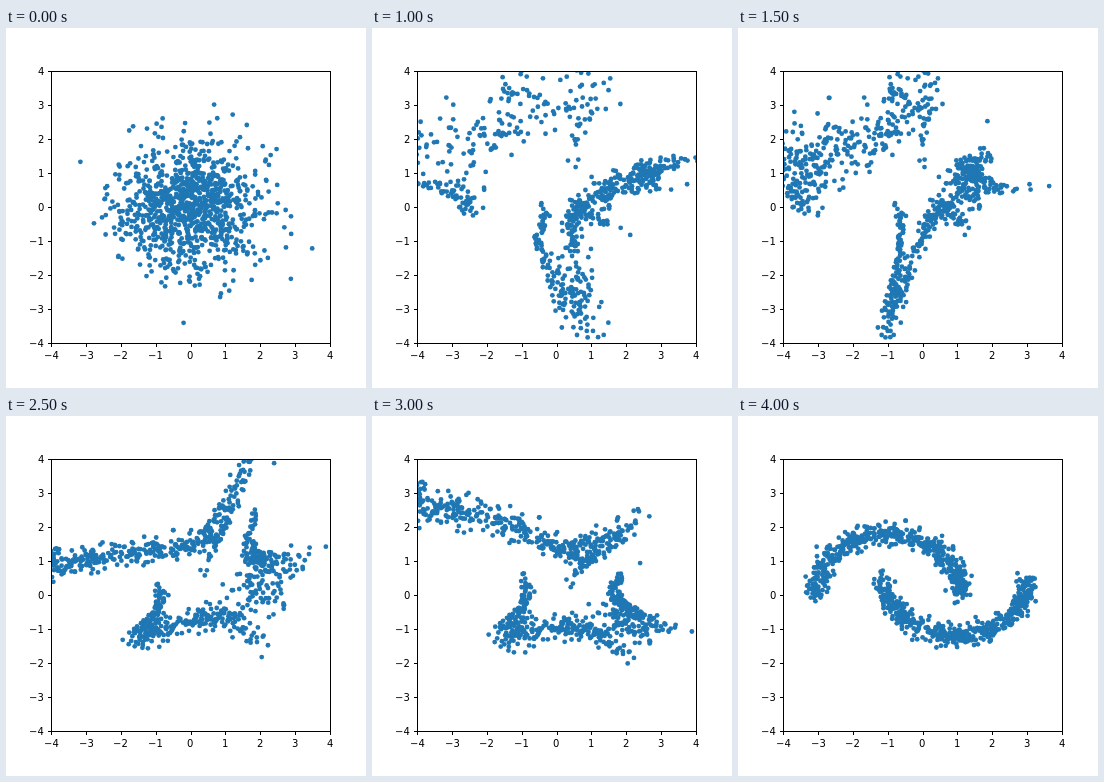
An HTML page with a canvas for the animation above (4.5 s loop, 360x360 px).

```html
<!DOCTYPE html>
<html lang="en">
<head>
<meta charset="utf-8">
<title>Coupling flow</title>
<style>
html, body { margin: 0; width: 100%; height: 100%; overflow: hidden; background: #fff; }
canvas { display: block; }
</style>
</head>
<body>
<canvas id="stage" width="360" height="360"></canvas>
<script>
const ctx = document.getElementById("stage").getContext("2d");
const STEP_MS = 500, COUNT = 1000, DOT_RADIUS = 2.4;
const BOX = { left: 45, right: 324, top: 43.2, bottom: 315 };
const toX = x => BOX.left + (x + 4) * (BOX.right - BOX.left) / 8;
const toY = y => BOX.bottom - (y + 4) * (BOX.bottom - BOX.top) / 8;

// Seeded random numbers
let seed = 20;
function random() {
  seed = (seed + 0x6d2b79f5) | 0;
  let t = Math.imul(seed ^ (seed >>> 15), 1 | seed);
  t = (t + Math.imul(t ^ (t >>> 7), 61 | t)) ^ t;
  return ((t ^ (t >>> 14)) >>> 0) / 4294967296;
}
function normalPair() {
  const r = Math.sqrt(-2 * Math.log(1 - random())), a = 2 * Math.PI * random();
  return [r * Math.cos(a), r * Math.sin(a)];
}

const sigmoid = z => 1 / (1 + Math.exp(-z));
const bump = (p, center, width) => Math.exp(-(((p - center) / width) ** 2));
const ramp = z => Math.max(0, z);

// Each layer rescales and shifts one coordinate by a rule of the other
const X = 0, Y = 1;
const firstLayer = { axis: X, scale: y => .5 + 2.5 * sigmoid((y + .2) / .5), shift: () => -.2 };
const laterLayers = [
  { axis: X,
    scale: y => .45 + .8 * bump(y, .05, .8),
    shift: y => -.25 - .4 * ramp(-y - .8) },
  { axis: Y,
    scale: x => .47 + 1.15 * sigmoid((x - .55) / .35),
    shift: x => .4 - 1.1 * bump(x, .9, 1.15) },
  { axis: X,
    scale: y => .4 + 1.2 * sigmoid((1.1 - y) / .35),
    shift: y => .1 + .4 * ramp(y) },
  { axis: Y,
    scale: x => .42 + sigmoid((.5 - x) / .9),
    shift: x => -.15 - .4 * x },
  { axis: X,
    scale: y => .6 + 1.05 * bump(y, .2, .85),
    shift: y => .25 - .22 * ramp(y - .3) },
  { axis: Y,
    scale: x => .7 + .35 * bump(x, .2, .7) - .25 * bump(x, 1.4, .4) + .45 * sigmoid((-x - 2.7) / .2),
    shift: x => -.1 + .42 * Math.cos(1.4 * x + 1.1) - 2.3 * sigmoid((-x - 2.7) / .17) }
];

function mapAxis(points, { axis, scale, shift }, change) {
  return points.map(point => {
    const other = point[1 - axis], next = [...point];
    next[axis] = change(point[axis], scale(other), shift(other));
    return next;
  });
}
const apply = (points, layer) => mapAxis(points, layer, (v, scale, shift) => v * scale + shift);
const undo = (points, layer) => mapAxis(points, layer, (v, scale, shift) => (v - shift) / scale);

// Two interlocking half moons with soft edges
function moonPoint(_, i) {
  const angle = Math.PI * random(), [dx, dy] = normalPair();
  const x = 2.08 * Math.cos(angle), y = Math.sin(angle);
  const [cx, cy] = i % 2 ? [x - 1, 1.8 * y] : [x + .95, .5 - 1.7 * y];
  return [cx + .15 * dx, cy + .16 * dy];
}

// The flow opens with the normal cloud; the rest is unrolled back from the moons
const cloud = Array.from({ length: COUNT }, normalPair);
const states = [Array.from({ length: COUNT }, moonPoint)];
for (const layer of [...laterLayers].reverse()) states.unshift(undo(states[0], layer));
states.unshift(cloud, apply(cloud, firstLayer));

function line(x1, y1, x2, y2) {
  ctx.beginPath();
  ctx.moveTo(x1, y1);
  ctx.lineTo(x2, y2);
  ctx.stroke();
}

function drawAxes() {
  ctx.strokeStyle = ctx.fillStyle = "#000";
  ctx.lineWidth = 1;
  ctx.font = '10px "DejaVu Sans", sans-serif';
  ctx.strokeRect(45.5, 43.5, 279, 272);
  for (let v = -4; v <= 4; v++) {
    const label = String(v).replace("-", "\u2212");
    const width = ctx.measureText(label).width;
    const x = Math.round(toX(v)), y = Math.round(toY(v));
    line(x + .5, 316, x + .5, 319);
    line(42, y + .5, 45, y + .5);
    ctx.fillText(label, Math.round(toX(v) - width / 2), 331);
    ctx.fillText(label, Math.round(38 - width), y + 4);
  }
}

function draw(points) {
  ctx.fillStyle = "#fff";
  ctx.fillRect(0, 0, 360, 360);
  ctx.save();
  ctx.beginPath();
  ctx.rect(BOX.left, BOX.top, BOX.right - BOX.left, BOX.bottom - BOX.top);
  ctx.clip();
  ctx.fillStyle = "#1f77b4";
  for (const [x, y] of points) {
    ctx.beginPath();
    ctx.arc(toX(x), toY(y), DOT_RADIUS, 0, 2 * Math.PI);
    ctx.fill();
  }
  ctx.restore();
  drawAxes();
}

let shown = -1;
function tick() {
  const step = Math.floor(performance.now() / STEP_MS) % states.length;
  if (step !== shown) draw(states[shown = step]);
  requestAnimationFrame(tick);
}
tick();
</script>
</body>
</html>
```
